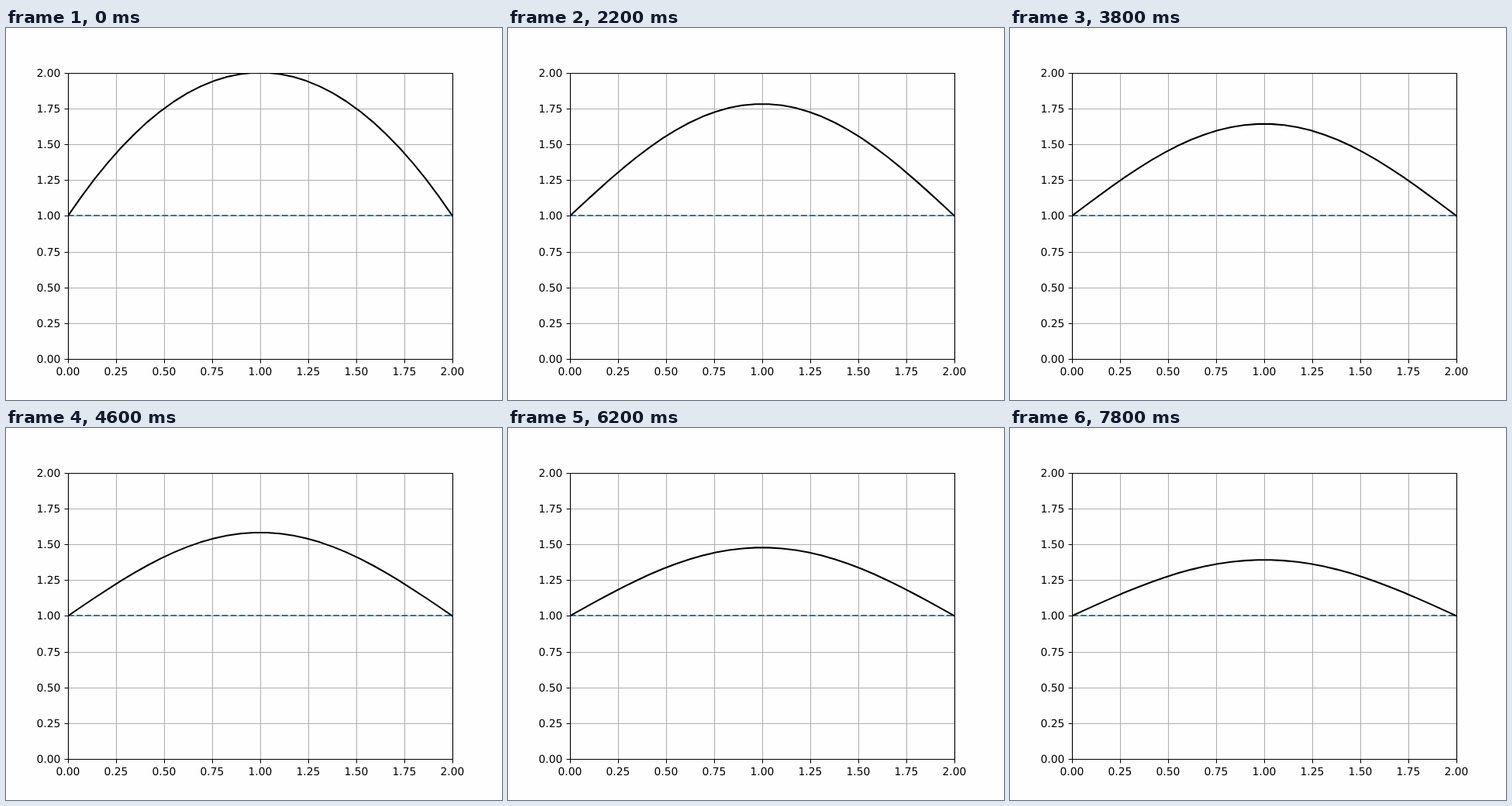
An HTML page that plays this animation: 640 px wide and 480 px high, repeating every 8000 ms.

```html
<!DOCTYPE html>
<html lang="en">
<head>
<meta charset="utf-8">
<title>Heat diffusion</title>
<style>
  html, body { margin: 0; width: 100%; height: 100%; overflow: hidden; background: #fefefe; }
  svg { display: block; width: 640px; height: 480px; }
  path, polyline { fill: none; stroke: #000; }
  .thin { stroke-width: 1.11; }
  .thick { stroke-width: 2.083; }
  #grid { stroke: #b0b0b0; }
  #base { stroke: #1f77b4; stroke-dasharray: 7.71 3.33; }
  #curve { stroke-linecap: square; stroke-linejoin: round; }
  text { font: 13.89px "DejaVu Sans", sans-serif; text-rendering: geometricPrecision; }
</style>
</head>
<body>
<svg viewBox="0 0 640 480">
  <clipPath id="box"><rect x="80" y="58" width="496" height="369"/></clipPath>
  <path id="grid" class="thin"/>
  <g clip-path="url(#box)">
    <path id="base" class="thick" d="M80 242H576"/>
    <polyline id="curve" class="thick"/>
  </g>
  <path id="ticks" class="thin"/>
  <path class="thin" d="M80.5 58.5H576.5V427.5H80.5Z"/>
  <g id="labels"></g>
</svg>
<script>
const STEP_MS = 200, STEPS = 40, POINTS = 30;
const DECAY = 0.0249; // decay of the lowest mode per step
const byId = id => document.getElementById(id);
const px = x => 80 + 248 * x;
const py = y => 427.2 - 184.8 * y;
const snap = v => Math.floor(v + 0.5) + 0.5;

function drawAxes() {
  let grid = '', ticks = '', labels = '';
  const label = (x, y, anchor, value) =>
    labels += `<text x="${x}" y="${y}" text-anchor="${anchor}">${value.toFixed(2)}</text>`;
  for (let v = 0; v <= 2; v += 0.25) {
    const x = snap(px(v)), y = snap(py(v));
    grid += `M${x} 58V427M80 ${y}H576`;
    ticks += `M${x} 427.5v5M80.5 ${y}h-5`;
    label(px(v), 448, 'middle', v);
    label(70.3, Math.round(py(v) + 5), 'end', v);
  }
  byId('grid').setAttribute('d', grid);
  byId('ticks').setAttribute('d', ticks);
  byId('labels').innerHTML = labels;
}

// Sine series of 1 + x(2 - x) diffusing between ends held at 1.
function heat(x, step) {
  let u = 1;
  for (let n = 1; n < 60; n += 2) {
    const k = n * Math.PI;
    u += 32 / k ** 3 * Math.sin(k * x / 2) * Math.exp(-n * n * DECAY * step);
  }
  return u;
}

function drawCurve(step) {
  const points = Array.from({ length: POINTS }, (_, i) => {
    const x = 2 * i / (POINTS - 1);
    return `${px(x).toFixed(2)},${py(heat(x, step)).toFixed(2)}`;
  });
  byId('curve').setAttribute('points', points.join(' '));
}

function frame() {
  drawCurve(Math.floor(performance.now() / STEP_MS) % STEPS);
  requestAnimationFrame(frame);
}

drawAxes();
frame();
</script>
</body>
</html>
```
